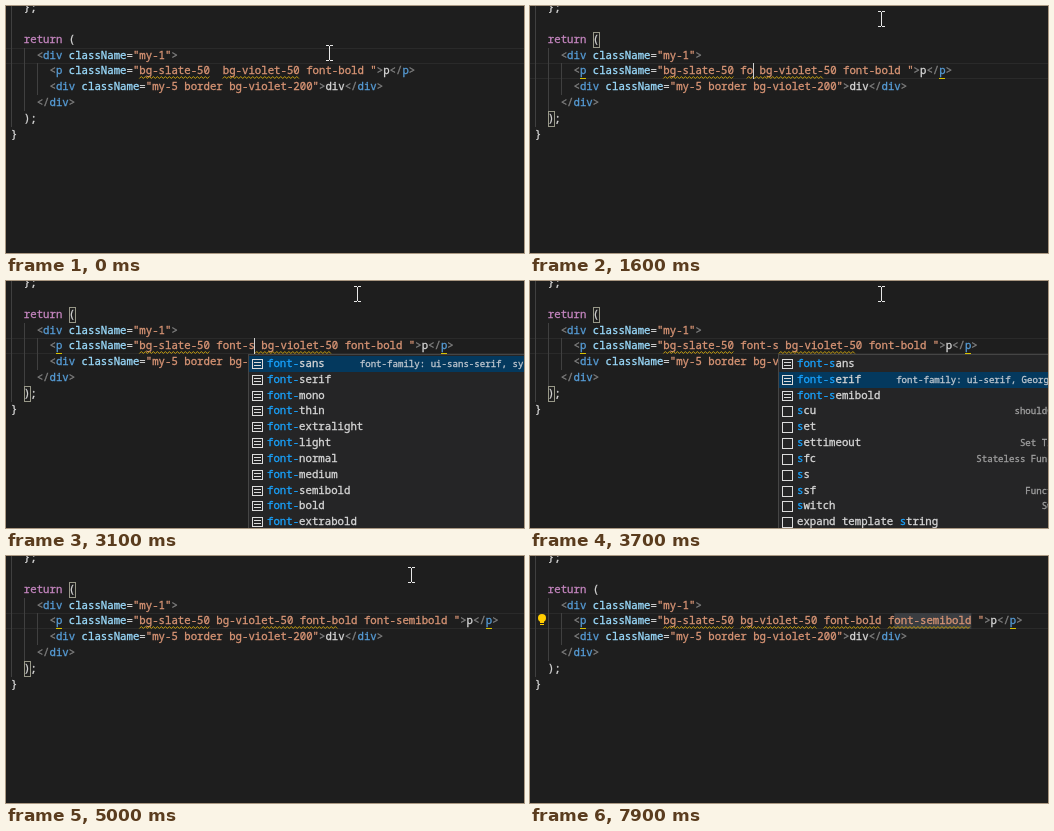
An HTML page with a canvas that plays this animation: 518x247 px, repeating every 8600 ms.

```html
<!DOCTYPE html>
<html lang="en">
<head>
<meta charset="utf-8">
<title>Sorting class names</title>
<style>
  html, body { margin: 0; width: 100%; height: 100%; overflow: hidden; background: #1e1e1e; }
  canvas { display: block; }
</style>
</head>
<body>
<canvas id="stage" width="518" height="247"></canvas>
<script>
const ctx = document.getElementById('stage').getContext('2d');
const LOOP = 8600, CHAR = 6.417, ROW = 15.83, LEFT = 5;
const DETAIL_CHAR = CHAR * 0.85;
const P_ROW = 4, FIRST_CLASS = 20, CARET_COL = 32;
const COLOR = {
  plain: '#d8d8d8', punct: '#808080', tag: '#569cd6', attr: '#9cdcfe',
  string: '#d99575', keyword: '#c586c0', match: '#18a3ff', warn: '#c8a010'
};

const colX = col => LEFT + col * CHAR;
const rowY = row => Math.ceil(57 + (row - P_ROW) * ROW);
const within = (t, ...spans) => spans.some(([from, to]) => t >= from && t < to);

// Latest entry of [time, value] pairs
const latest = (t, steps) => steps.filter(([at]) => at <= t).pop()[1];

const typedSteps = [[0, ''], [1400, 'f'], [1500, 'fo'], [1800, 'font'], [2200, 'font-'],
  [3100, 'font-s'], [4000, 'font-semibold']];

// Underlined column ranges lag behind the typing
const warningSteps = [
  [0, [[20, 31], [33, 45]]],
  [2700, [[20, 31], [38, 50]]],
  [4000, [[20, 31], [39, 51]]],
  [5900, [[20, 31], [32, 44], [45, 54], [55, 68]]]
];

const pointerPath = [
  [0, 323, 47], [300, 212, 65], [400, 212, 65], [600, 351, 13], [4900, 351, 13],
  [5000, 405, 19], [5400, 512, 42], [5800, 505, 46], [6200, 505, 46],
  [6700, 441, 68], [7000, 366, 68], [7200, 505, 75], [7300, 560, 75]
];

const fontList = [
  ['font-sans', 'font-family: ui-sans-serif, system-ui, -apple'], ['font-serif'], ['font-mono'],
  ['font-thin'], ['font-extralight'], ['font-light'], ['font-normal'], ['font-medium'],
  ['font-semibold'], ['font-bold'], ['font-extrabold']
];
const filteredList = [
  ['font-sans', 'font-family: ui-sans-serif, system-ui, -apple'],
  ['font-serif', 'font-family: ui-serif, Georgia, Cambria, "Times'],
  ['font-semibold', 'font-weight: 600;'],
  ['scu', 'shouldComponentUpdate'], ['set'], ['settimeout', 'Set Timeout Template'],
  ['sfc', 'Stateless Function Component'], ['ss'], ['ssf', 'Functional setState'],
  ['switch', 'Switch Statement'], ['expand template string']
];

function setFont(advance) {
  ctx.font = `${advance / 0.6}px "Noto Sans Mono", monospace`;
}

// A hairline stroke gives the glyphs a slightly stronger weight
function drawText(text, x, y, color, advance = CHAR) {
  ctx.fillStyle = ctx.strokeStyle = color;
  ctx.lineWidth = 0.3;
  [...text].forEach((ch, i) => {
    if (ch === ' ') return;
    ctx.fillText(ch, x + i * advance, y);
    ctx.strokeText(ch, x + i * advance, y);
  });
}

function drawTokens(tokens, x, y) {
  for (const [kind, text] of tokens) {
    drawText(text, x, y, COLOR[kind]);
    x += text.length * CHAR;
  }
}

const drawLine = (row, col, ...tokens) => drawTokens(tokens, colX(col), rowY(row) + 11);

function fill(color, x, y, w, h) {
  ctx.fillStyle = color;
  ctx.fillRect(x, y, w, h);
}

function outline(color, x, y, w, h) {
  ctx.strokeStyle = color;
  ctx.lineWidth = 1;
  ctx.strokeRect(x + 0.5, y + 0.5, w - 1, h - 1);
}

const openTag = (name, classes) => [['punct', '<'], ['tag', name], ['attr', ' className'],
  ['plain', '='], ['string', `"${classes}"`], ['punct', '>']];
const closeTag = name => [['punct', '</'], ['tag', name], ['punct', '>']];

function classesAt(t) {
  if (t >= 4500) return 'bg-slate-50 bg-violet-50 font-bold font-semibold ';
  return `bg-slate-50 ${latest(t, typedSteps)} bg-violet-50 font-bold `;
}

function drawCode(classes) {
  drawLine(0, 2, ['plain', '};']);
  drawLine(2, 2, ['keyword', 'return'], ['plain', ' (']);
  drawLine(3, 4, ...openTag('div', 'my-1'));
  drawLine(4, 6, ...openTag('p', classes), ['plain', 'p'], ...closeTag('p'));
  drawLine(5, 6, ...openTag('div', 'my-5 border bg-violet-200'), ['plain', 'div'], ...closeTag('div'));
  drawLine(6, 4, ...closeTag('div'));
  drawLine(7, 2, ['plain', ');']);
  drawLine(8, 0, ['plain', '}']);
}

function drawSquiggle([from, to]) {
  const end = colX(to);
  ctx.strokeStyle = COLOR.warn;
  ctx.lineWidth = 1;
  ctx.beginPath();
  for (let x = colX(from), i = 0; x <= end; x += 2, i++) ctx.lineTo(x, i % 2 ? 70.5 : 72.5);
  ctx.stroke();
}

function drawBulb() {
  ctx.fillStyle = '#ffcc00';
  ctx.beginPath();
  ctx.arc(12, 62, 4, 0, Math.PI * 2);
  ctx.fill();
  fill('#ffcc00', 10, 65, 4, 2);
  fill('#ffcc00', 10, 68, 4, 1);
}

function drawIcon(x, y, isSnippet) {
  outline('#dcdcdc', x, y - 5, 11, isSnippet ? 11 : 10);
  if (!isSnippet) {
    fill('#dcdcdc', x + 2, y - 2, 7, 1);
    fill('#dcdcdc', x + 2, y + 1, 7, 1);
  }
}

function drawPopup(list, left, query, selected) {
  fill('#252526', left, 73, 360, 180);
  outline('#454545', left, 73, 360, 180);
  list.forEach(([label, detail], i) => {
    const top = Math.round(75 + i * ROW), base = top + 11, x = left + 19;
    const isFont = label.startsWith('font');
    if (i === selected) fill('#04395e', left + 1, top, 358, 16);
    drawIcon(left + 4, top + 8, !isFont);

    const key = isFont ? query : 's';
    const at = label.indexOf(key);
    drawTokens([['plain', label.slice(0, at)], ['match', key],
      ['plain', label.slice(at + key.length)]], x, base);

    if (detail && (!isFont || i === selected)) {
      setFont(DETAIL_CHAR);
      const minX = x + label.length * CHAR + 35;
      const detailX = Math.max(minX, left + 351 - detail.length * DETAIL_CHAR);
      drawText(detail, detailX, base, isFont ? '#c0c8d0' : '#a0a0a0', DETAIL_CHAR);
      setFont(CHAR);
    }
  });
}

function drawPointer(t) {
  const next = pointerPath.findIndex(([at]) => at > t);
  if (next < 0) return;
  const [t0, x0, y0] = pointerPath[next - 1], [t1, x1, y1] = pointerPath[next];
  const k = (t - t0) / (t1 - t0);
  const x = Math.round(x0 + (x1 - x0) * k), y = Math.round(y0 + (y1 - y0) * k);
  fill('#e8e8e8', x, y - 7, 1, 14);
  for (const edge of [y - 8, y + 7]) {
    fill('#e8e8e8', x - 3, edge, 3, 1);
    fill('#e8e8e8', x + 1, edge, 3, 1);
  }
}

function draw(t) {
  const clicked = t >= 300;
  const classes = classesAt(t);
  const selectStart = t < 6800 ? 68 : Math.max(56, 68 - 4 * ((t - 6700) / 100));

  fill('#1e1e1e', 0, 0, 518, 247);
  const lineTop = rowY(clicked ? P_ROW : 3);
  fill('#2a2a2a', 0, lineTop, 518, 1);
  fill('#2a2a2a', 0, lineTop + 15, 518, 1);
  [[0, 0, 8], [2, 3, 7], [4, 4, 6]].forEach(([col, from, to]) =>
    fill('#404040', Math.round(colX(col)), rowY(from), 1, rowY(to) - rowY(from)));

  if (selectStart < 68) {
    fill(t < 7900 ? '#264f78' : '#3a3d41', colX(selectStart), 57, (68 - selectStart) * CHAR, 16);
  }
  if (clicked && t < 6800) {
    for (const [col, row] of [[9, 2], [2, 7]]) {
      outline('#989888', Math.round(colX(col)), rowY(row), 7, 16);
    }
  }

  setFont(CHAR);
  drawCode(classes);
  latest(t, warningSteps).forEach(drawSquiggle);
  if (clicked) {
    const closing = FIRST_CLASS + classes.length + 5;
    for (const col of [7, closing]) fill('#d8c200', Math.round(colX(col)), 72, 6, 1);
  }
  if (within(t, [400, 1100], [5400, LOOP])) drawBulb();

  if (within(t, [300, 800], [900, 2600], [3100, 3600], [4000, 4500])) {
    fill('#d0d0d0', Math.floor(colX(CARET_COL + latest(t, typedSteps).length)), 57, 1, 16);
  }
  if (within(t, [7000, 7500])) fill('#d0d0d0', 364, 57, 1, 16);

  if (within(t, [2700, 3200])) drawPopup(fontList, 242, 'font-', 0);
  if (within(t, [3200, 4000])) {
    drawPopup(filteredList, 248, 'font-s', latest(t, [[0, 0], [3700, 1], [3800, 2]]));
  }
  drawPointer(t);
}

function tick() {
  draw(Math.floor((performance.now() % LOOP) / 100) * 100);
  requestAnimationFrame(tick);
}
tick();
</script>
</body>
</html>
```
